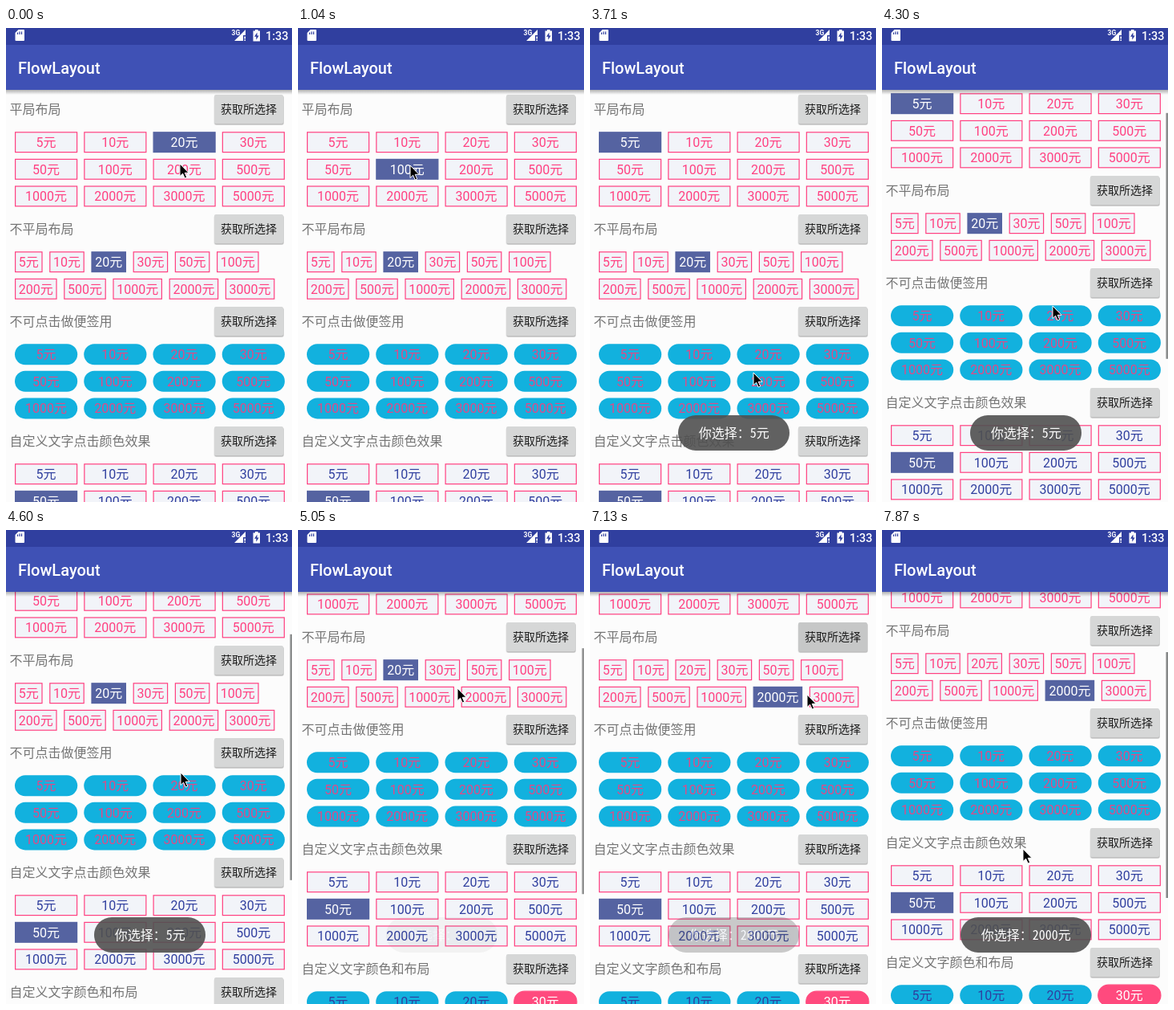
Recreate the animation shown at these times as an HTML page. Size 357x590 px, loop 8 s.

```html
<!DOCTYPE html>
<html lang="zh-CN">
<head>
<meta charset="utf-8">
<title>FlowLayout</title>
<style>
html, body { margin: 0; width: 100%; height: 100%; overflow: hidden; background: #fcfcfc; }
svg { display: block; width: 357px; height: 590px; }
text { font-family: Roboto, "Noto Sans CJK SC", "Noto Sans CJK", sans-serif; font-size: 16px; }
.mid { text-anchor: middle; }
#toast text { font-family: "Noto Sans Mono CJK SC", "Noto Sans CJK SC", "Noto Sans CJK", sans-serif; }
</style>
</head>
<body>
<svg id="stage" viewBox="0 0 357 590">
  <defs>
    <linearGradient id="fade" x1="0" y1="0" x2="0" y2="1">
      <stop offset="0" stop-color="#000" stop-opacity=".3"/>
      <stop offset="1" stop-color="#000" stop-opacity="0"/>
    </linearGradient>
    <clipPath id="view"><rect y="77" width="357" height="513"/></clipPath>
  </defs>
  <rect width="357" height="590" fill="#fcfcfc"/>
  <g clip-path="url(#view)"><g id="list"></g></g>
  <rect id="bar" x="354.5" width="2.5" height="306" fill="#858787"/>
  <rect y="77" width="357" height="6" fill="url(#fade)"/>
  <rect width="357" height="77" fill="#3f51b5"/>
  <rect width="357" height="21" fill="#303f9f"/>
  <text x="15" y="57" fill="#fff" style="font-size:20px;font-weight:500">FlowLayout</text>
  <g fill="#fff">
    <path d="M15.5 2H22q1 0 1 1V15q0 1-1 1H12.500q-1 0-1-1V6z"/>
    <path d="M14.500 5.500v2.500M17 4.500v3.500M19.500 4.500v3.500" stroke="#303f9f" stroke-width="1.200"/>
    <text x="281.500" y="9" style="font-size:8.500px;font-weight:700">3G</text>
    <path d="M285 16L299 2V9H296V16z"/>
    <path d="M297.400 10.500h1.600v3h-1.600zM297.400 14.500h1.600v1.500h-1.600z"/>
    <path d="M308.500 3.500H311V2h3.500v1.500H317V16.500H308.500z"/>
    <path d="M313.500 5.500L310 10.800h2.300v4l3.400-5.400h-2.200z" fill="#303f9f"/>
    <text x="324" y="15" style="font-size:14.500px;font-weight:500">1:33</text>
  </g>
  <g id="toast">
    <rect y="482" height="44" rx="22" fill="#505050" fill-opacity=".9"/>
    <text class="mid" x="179.700" y="510" fill="#fff"></text>
  </g>
  <path id="cursor" d="M0 0V15.500L3.600 12.200L6.200 18L8.700 16.900L6.200 11.300H11z"
    fill="#000" stroke="#fff" stroke-width="1"/>
</svg>
<script>
const $ = id => document.getElementById(id);
const LOOP = 8000, STEP = 148.5;
const PINK = '#ff4081', NAVY = '#303f9f', CYAN = '#12b1de', SLATE = '#5563a1';
const amounts = [5, 10, 20, 30, 50, 100, 200, 500, 1000, 2000, 3000, 5000];

function add(parent, tag, attrs, label) {
  const el = document.createElementNS('http://www.w3.org/2000/svg', tag);
  for (const k in attrs) el.setAttribute(k, attrs[k]);
  if (label) el.textContent = label;
  parent.appendChild(el);
  return el;
}

const looks = {
  box: { fill: '#f2f4f9', line: PINK, ink: PINK, on: SLATE },
  tag: { fill: CYAN, ink: '#e04a88', pill: true },
  navy: { fill: '#f2f4f9', line: PINK, ink: NAVY, on: SLATE },
  mix: { fill: CYAN, ink: NAVY, on: '#ff4a7e', pill: true }
};

function makeCell(value, x, y, w, look) {
  const inset = look.line ? 0.6 : 0;
  const rect = add($('list'), 'rect', {
    x: x + inset, y: y + inset, width: w - 2 * inset, height: 26 - 2 * inset,
    rx: look.pill ? 13 : 0, 'stroke-width': 1.2
  });
  const text = add($('list'), 'text', { x: x + w / 2, y: y + 19, class: 'mid' }, value + '元');
  return { value, rect, text, look };
}

function select(cells, value) {
  for (const { value: v, rect, text, look } of cells) {
    const on = v === value;
    rect.setAttribute('fill', on ? look.on : look.fill);
    rect.setAttribute('stroke', on ? look.on : look.line || 'none');
    text.setAttribute('fill', on ? '#fff' : look.ink);
  }
}

function makeSection(title, mid, look, flow) {
  const list = $('list');
  add(list, 'text', { x: 4.5, y: mid + 6, fill: '#757575' }, title);
  add(list, 'rect', { x: 259.5, y: mid - 17, width: 87.5, height: 37, rx: 3, fill: '#000', 'fill-opacity': 0.1 });
  add(list, 'rect', { x: 260.5, y: mid - 17, width: 86, height: 36.5, rx: 2, fill: '#000', 'fill-opacity': 0.15 });
  const button = add(list, 'rect', { x: 260, y: mid - 18, width: 86, height: 36, rx: 2 });
  add(list, 'text', { x: 303, y: mid + 5.3, class: 'mid', fill: '#1c1c1c', style: 'font-size:14px' }, '获取所选择');

  let x = 11, row = 0;
  const cells = amounts.slice(0, flow ? 11 : 12).map((value, i) => {
    const w = flow ? 25.6 + 9 * String(value).length : 78.2;
    if (flow ? i === 6 : i && i % 4 === 0) { x = 11; row++; }
    const cell = makeCell(value, x, mid + 28.2 + row * 33.6, w, look);
    x += w + (flow ? 8.6 : 8.05);
    return cell;
  });
  return { button, cells };
}

const even = makeSection('平局布局', 101, looks.box);
const flow = makeSection('不平局布局', 250, looks.box, true);
const tags = makeSection('不可点击做便签用', 365, looks.tag);
const navy = makeSection('自定义文字点击颜色效果', 514, looks.navy);
const mix = makeSection('自定义文字颜色和布局', 663, looks.mix);
select(tags.cells);
select(navy.cells, 50);
select(mix.cells, 30);
for (const s of [even, flow, tags, navy, mix]) s.button.setAttribute('fill', '#d6d7d7');

// Keys are [step, ...values]
const path = [
  [1, 217, 169], [4, 180, 181], [7, 140, 171], [8, 140, 171], [12, 50, 145], [13, 50, 142],
  [16, 290, 106], [17, 290, 106], [18, 286, 125], [25, 204, 429], [27, 208, 390],
  [31, 218, 302], [33, 210, 240], [34, 199, 197], [36, 192, 206], [37, 192, 206],
  [38, 180, 175], [39, 180, 175], [40, 168, 206], [41, 233, 211], [42, 233, 211],
  [43, 236, 212], [46, 296, 131], [47, 296, 131], [48, 271, 205], [51, 195, 405], [52, 180, 405], [53, 176, 397]
];
const scrolling = [[26, 0], [27, 8], [31, 88], [32, 106], [33, 117], [52, 117], [53, 125]];
const toastFade = [[17, 0], [18, 0.33], [19, 0.8], [20, 1], [32, 1], [33, 0.55], [34, 0.06], [35, 0],
  [47, 0], [48, 0.33], [49, 0.8], [50, 1]];
const barFade = [[25, 0], [26, 1], [34, 0.9], [36, 0], [51, 0], [52, 1]];
const press1 = [[17, 0], [18, 4], [20, 0]];
const press2 = [[47, 0], [48, 16], [51, 0]];
const evenPick = [[0, 20], [2, 200], [7, 100], [13, 5]];
const flowPick = [[0, 20], [38, 30], [40, 1000], [43, 2000]];

function at(keys, k, i = 1) {
  const n = keys.findIndex(key => key[0] >= k);
  if (n < 0) return keys[keys.length - 1][i];
  if (n === 0) return keys[0][i];
  const a = keys[n - 1], b = keys[n];
  return a[i] + (b[i] - a[i]) * (k - a[0]) / (b[0] - a[0]);
}

const held = (keys, k) => keys.filter(key => key[0] <= k).pop()[1];

function tint(button, dark) {
  const c = Math.round(214 - dark);
  button.setAttribute('fill', `rgb(${c},${c + 1},${c + 1})`);
}

function draw(k) {
  const scroll = at(scrolling, k);
  $('list').setAttribute('transform', `translate(0 ${-scroll})`);
  $('bar').setAttribute('y', 77 + scroll * 0.6);
  $('bar').setAttribute('opacity', at(barFade, k));
  $('cursor').setAttribute('transform', `translate(${at(path, k, 1)} ${at(path, k, 2)})`);
  select(even.cells, held(evenPick, k));
  select(flow.cells, held(flowPick, k));
  tint(even.button, at(press1, k));
  tint(flow.button, at(press2, k));

  const value = k < 40 ? 5 : 2000;
  const width = value === 5 ? 139 : 163;
  const [box, label] = $('toast').children;
  box.setAttribute('x', 179.5 - width / 2);
  box.setAttribute('width', width);
  label.textContent = `你选择：${value}元`;
  $('toast').setAttribute('opacity', at(toastFade, k));
}

function tick() {
  const t = performance.now() % LOOP;
  draw(Math.min(53, Math.floor((t + 8) / STEP)));
  requestAnimationFrame(tick);
}
tick();
</script>
</body>
</html>
```
